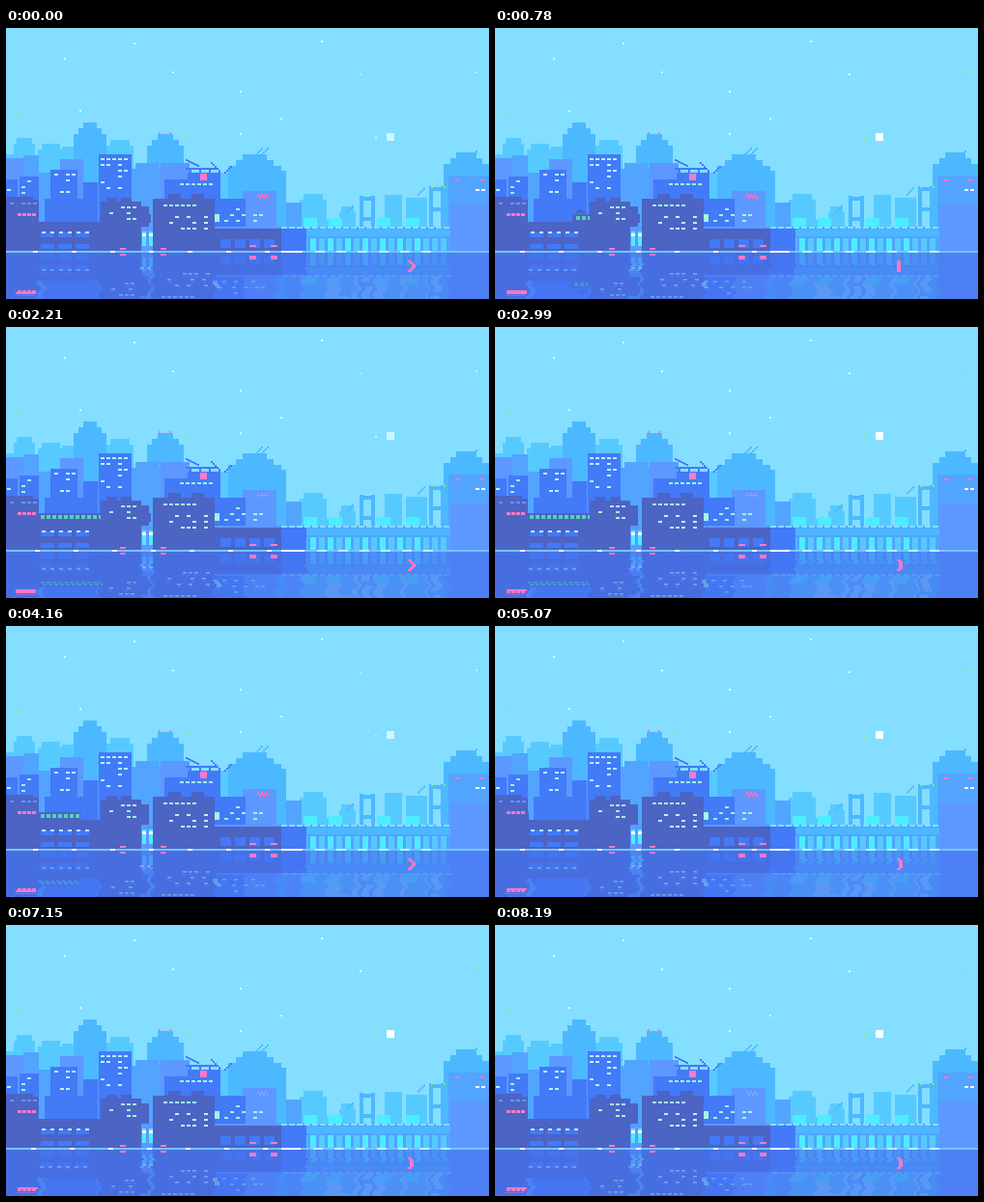
These frames come from a looping animation (500 px wide and 281 px high, 8320 ms). An HTML page with a canvas:

```html
<!DOCTYPE html>
<html lang="en">
<head>
<meta charset="utf-8">
<title>Bay city</title>
<style>
html, body { margin: 0; width: 100%; height: 100%; overflow: hidden; background: #84deff; }
canvas { display: block; width: 500px; height: 281px; }
</style>
</head>
<body>
<canvas id="stage" width="500" height="281"></canvas>
<script>
const W = 500, H = 281, SHORE = 232, STEP = 130, FRAMES = 64, WAVES = 8;
const SKY = '#84deff', FAR = '#56caff', BACK = '#4cb8ff', HAZE = '#52a4ff', MID = '#5c98ff',
  BLUE = '#427af8', DARK = '#4c64c4', CYAN = '#4eecff', PALE = '#b8f4ff', MINT = '#a4f4e4',
  WHITE = '#ffffff', PINK = '#ff78c8', LIME = '#8cf060', TEAL = '#50d4b0';

function layer() {
  const c = document.createElement('canvas');
  c.width = W;
  c.height = H;
  return c.getContext('2d');
}

const out = document.getElementById('stage').getContext('2d');
const back = layer(), front = layer(), neon = layer(), scene = layer();

let seed = 7;
function random() {
  seed = (seed * 16807) % 2147483647;
  return seed / 2147483647;
}

function rect(g, color, x, y, w, h) {
  g.fillStyle = color;
  g.fillRect(x, y, w, h);
}

// Body down to the shore, with narrower storeys stepping up from the roof
function tower(g, color, x, w, top, caps = 0) {
  rect(g, color, x, top, w, SHORE - top);
  for (let i = 1; i <= caps; i++) {
    const inset = Math.round(w * 0.14 * i);
    rect(g, color, x + inset, top - 6 * i, w - 2 * inset, 6);
  }
}

function row(g, color, x0, x1, y, pitch = 6, w = 4, h = 2) {
  for (let x = x0; x + w <= x1; x += pitch) rect(g, color, x, y, w, h);
}

// Window grid; only a share of the windows is lit
function windows(g, color, x, w, top, rows, share, gap = 6) {
  for (let r = 0; r < rows; r++) {
    for (let i = x; i + 4 <= x + w; i += 6) {
      if (random() < share) rect(g, color, i, top + r * gap, 4, 2);
    }
  }
}

function diagonal(g, color, x, y, n, dy = -2) {
  for (let i = 0; i < n; i++) rect(g, color, x + 2 * i, y + dy * i, 2, 2);
}

function drawFarCity(g) {
  tower(g, FAR, 0, 9, 131);
  tower(g, FAR, 8, 22, 120, 1);
  tower(g, FAR, 33, 27, 126, 1);
  tower(g, FAR, 58, 14, 123);
  tower(g, FAR, 104, 28, 122, 1);
  tower(g, FAR, 184, 48, 150);
  tower(g, FAR, 304, 28, 178, 1);
  tower(g, FAR, 328, 18, 199);
  tower(g, FAR, 345, 17, 191, 1);
  tower(g, FAR, 392, 18, 173);
  tower(g, FAR, 414, 22, 176);
  tower(g, BACK, 70, 34, 110, 2);
  tower(g, BACK, 146, 38, 122, 2);
  tower(g, BACK, 230, 55, 143, 2);
  tower(g, BACK, 276, 14, 148);
  tower(g, BACK, 453, 47, 141, 2);
  tower(g, HAZE, 290, 16, 181);
  for (const x of [258, 264, 352, 426, 480]) diagonal(g, BACK, x, x < 300 ? 130 : x < 440 ? 190 - (x - 352) / 4 : 133, 4);
  for (const x of [308, 334, 384, 414]) rect(g, CYAN, x, 197, 14, 10);
}

function drawMidCity(g) {
  tower(g, MID, 0, 18, 135);
  tower(g, HAZE, 18, 16, 132);
  tower(g, HAZE, 34, 14, 150);
  tower(g, MID, 56, 24, 136);
  tower(g, MID, 74, 22, 160);
  tower(g, HAZE, 130, 32, 146, 1);
  tower(g, MID, 160, 30, 140);
  tower(g, MID, 245, 35, 169);
  tower(g, HAZE, 458, 42, 153);
  tower(g, MID, 460, 40, 183);
  tower(g, BLUE, 0, 12, 157);
  tower(g, BLUE, 14, 20, 154);
  tower(g, BLUE, 46, 28, 147);
  tower(g, BLUE, 80, 15, 160);
  tower(g, BLUE, 40, 54, 177);
  tower(g, BLUE, 96, 34, 131);
  tower(g, BLUE, 164, 26, 157);
  tower(g, BLUE, 188, 34, 150);
  tower(g, BLUE, 222, 26, 177);

  windows(g, PALE, 50, 22, 151, 4, 0.5);
  windows(g, MINT, 16, 16, 158, 3, 0.5);
  windows(g, PALE, 1, 10, 161, 2, 0.6);
  windows(g, PALE, 98, 30, 135, 1, 1);
  windows(g, PALE, 98, 30, 141, 5, 0.3);
  windows(g, MINT, 180, 38, 161, 1, 1);
  windows(g, MINT, 226, 50, 181, 4, 0.3);
  windows(g, WHITE, 462, 36, 167, 1, 0.4);

  // Roof scaffolding
  diagonal(g, BLUE, 186, 136, 7, 1);
  diagonal(g, BLUE, 212, 139, 5, 2);
  row(g, BLUE, 190, 222, 147, 10, 2, 4);
  rect(g, BLUE, 186, 145, 34, 2);
  diagonal(g, BLUE, 226, 149, 4);
}

function drawBridge(g) {
  for (const [x, top] of [[366, 174], [438, 164]]) {
    for (const leg of [0, 12]) rect(g, BACK, x + leg, top, 4, SHORE - top);
    for (const beam of [1, 22]) rect(g, BACK, x, top + beam, 16, 4);
  }
  rect(g, HAZE, 285, 206, 175, SHORE - 206);
  rect(g, BACK, 310, 209, 150, 7);
  row(g, SKY, 285, 460, 206, 8, 6);
  for (let x = 288; x < 456; x += 9) {
    rect(g, x > 312 && x < 430 && x % 2 ? CYAN : FAR, x, 218, 6, 13);
  }
}

function drawShore(g) {
  tower(g, DARK, 0, 34, 178);
  rect(g, DARK, 0, 175, 28, 3);
  tower(g, DARK, 34, 64, 201);
  tower(g, DARK, 98, 42, 180);
  row(g, DARK, 104, 134, 176, 15, 11, 4);
  tower(g, DARK, 138, 10, 185);
  tower(g, DARK, 152, 64, 177);
  row(g, DARK, 168, 208, 172, 24, 13, 5);
  tower(g, DARK, 216, 69, 206);
  rect(g, MID, 140, 206, 12, SHORE - 206);
  row(g, CYAN, 141, 152, 211, 7, 4, 15);
  row(g, WHITE, 141, 152, 213, 7, 4, 3);
  row(g, BLUE, 36, 98, 212, 18, 14, 5);
  row(g, BLUE, 36, 98, 224, 18, 14, 5);
  row(g, BLUE, 222, 282, 219, 15, 11, 9);
  rect(g, BLUE, 285, 208, 26, SHORE - 208);
  rect(g, MID, 216, 206, 69, 2);
  row(g, PALE, 37, 94, 211, 9);
  rect(g, MINT, 216, 193, 5, 8);

  windows(g, MINT, 163, 36, 183, 1, 1);
  windows(g, PALE, 163, 50, 195, 3, 0.3);
  windows(g, MINT, 101, 36, 185, 3, 0.5);
  windows(g, MID, 4, 28, 181, 1, 0.8);
}

function drawNeon(g) {
  row(g, PINK, 12, 32, 192, 5, 4, 3);
  rect(g, PINK, 201, 151, 7, 7);
  for (let i = 0; i < 12; i++) rect(g, PINK, 260 + 2 * (i % 6), 172 + 2 * (i % 2) + 2 * Math.floor(i / 6), 2, 1);
  row(g, PINK, 118, 166, 228, 42, 6, 2);
  row(g, PINK, 252, 282, 225, 22, 7, 2);
  row(g, PINK, 158, 172, 108, 11, 2);
  row(g, PINK, 465, 498, 157, 25, 5);
  row(g, LIME, 440, 456, 164, 13, 2);
}

// Mirror a layer below the shore, each row swaying with the waves
function reflect(g, source, p, stretch) {
  for (let y = SHORE; y < H; y += 2) {
    const depth = y - SHORE;
    const shift = 2 * Math.round((0.3 + depth / 45) * Math.sin(y * 0.45 + p * 2 * Math.PI / WAVES));
    const from = Math.round(SHORE - 2 - depth * stretch);
    for (const x of [0, shift]) g.drawImage(source.canvas, 0, from, W, 1, x, y, W, 2);
  }
}

function drawTrain(g, f) {
  const nose = 116 - 6 * f, length = 153;
  g.save();
  g.beginPath();
  g.rect(0, 185, 150, 20);
  g.clip();
  rect(g, DARK, nose, 193, length, 9);
  rect(g, DARK, nose + 4, 190, 10, 2);
  rect(g, DARK, nose + 6, 188, 4, 2);
  row(g, TEAL, nose + 4, nose + length, 195, 6, 4, 4);
  g.restore();
}

const stars = [[132, 15], [60, 31], [172, 45], [326, 13], [242, 65], [284, 93], [242, 109], [76, 85]];

function drawSky(g, p) {
  const dim = p < 2;
  rect(g, SKY, 0, 0, W, H);
  for (const [x, y] of stars) rect(g, '#e0f8ff', x, y, 2, 2);
  for (const [x, y] of [[12, 88], [186, 112]]) rect(g, LIME, x, y, 2, 2);
  for (const [x, y] of [[486, 45], [382, 113]]) rect(g, dim ? '#c8f4ff' : LIME, x, y, 2, 2);
  rect(g, dim ? '#b0ecff' : WHITE, 366, 47, 2, 2);
  rect(g, dim ? '#d0f6ff' : WHITE, 394, 109, 8, 8);
}

function drawWater(g, p) {
  const angle = p * 2 * Math.PI / WAVES;
  reflect(g, scene, p, 1);
  rect(g, 'rgba(70, 116, 240, 0.65)', 0, SHORE, W, H - SHORE);
  reflect(g, neon, p, 0.89);

  // A lone pink light bending on the swell
  const bend = 1 + Math.cos(angle - Math.PI / 4);
  for (let i = 0; i < 6; i++) rect(g, PINK, 416 + 2 * Math.round(bend * Math.sin(i * Math.PI / 5)), 241 + 2 * i, 4, 2);

  const drift = 2 * Math.round(Math.sin(angle));
  rect(g, '#74c4ff', 0, 231, W, 2);
  row(g, WHITE, 28 + drift, 300, 231, 40, 5);
  rect(g, WHITE, 285, 231, 22 + drift, 2);
  row(g, PALE, 320 + drift, 460, 231, 22, 10);
}

drawFarCity(back);
drawMidCity(back);
drawBridge(back);
drawShore(front);
drawNeon(neon);

function draw(now) {
  const f = Math.floor(now / STEP) % FRAMES, p = f % WAVES;
  drawSky(scene, p);
  scene.drawImage(back.canvas, 0, 0);
  drawTrain(scene, f);
  scene.drawImage(front.canvas, 0, 0);
  out.drawImage(scene.canvas, 0, 0);
  out.drawImage(neon.canvas, 0, 0);
  drawWater(out, p);
}

const start = performance.now();
function tick() {
  draw(performance.now() - start);
  requestAnimationFrame(tick);
}
tick();
</script>
</body>
</html>
```
